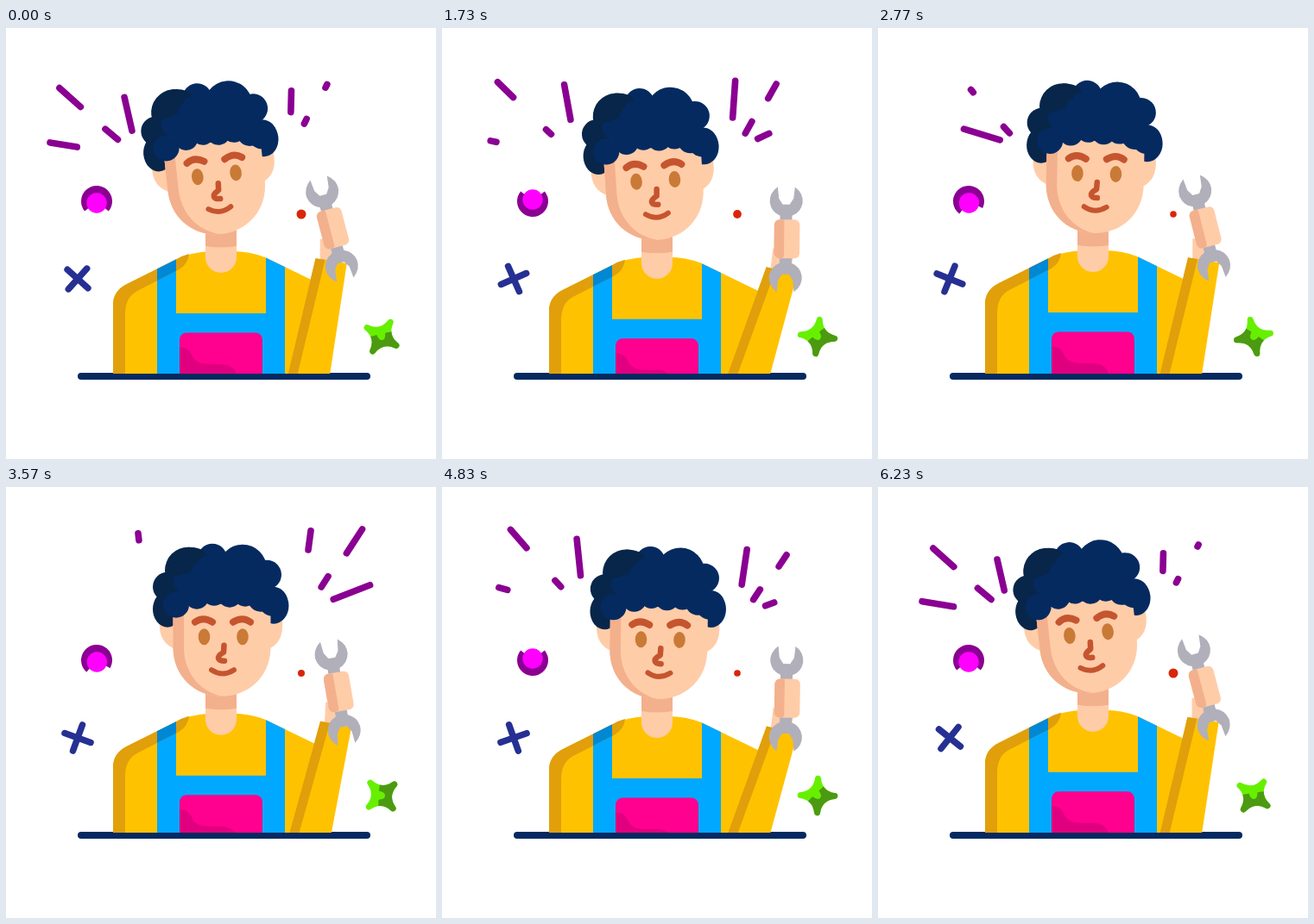
An HTML page with a canvas that plays this animation: 498x500 px, repeating every 6260 ms.

```html
<!DOCTYPE html>
<html lang="en">
<head>
<meta charset="utf-8">
<title>Handyman</title>
<style>
html, body { margin: 0; width: 100%; height: 100%; overflow: hidden; background: #fff; }
canvas { display: block; width: 498px; height: 500px; }
</style>
</head>
<body>
<canvas id="stage" width="498" height="500"></canvas>
<script>
const ctx = document.getElementById('stage').getContext('2d');
const LOOP = 6260, BURST = LOOP / 4, TAU = Math.PI * 2, DEG = Math.PI / 180;
const C = {
  yellow: '#ffc200', ochre: '#e09f0b', blue: '#00a8ff', deepBlue: '#0088d4',
  pink: '#ff008f', deepPink: '#e0007f', skin: '#ffcca8', shade: '#f3b08c',
  navy: '#052a60', dark: '#08264a', rust: '#c5552f', eye: '#c97a36',
  steel: '#b1afb9', purple: '#8a0092', magenta: '#ff00ff', red: '#d9260a',
  indigo: '#263093', lime: '#66f000', green: '#4c9a12'
};

// Burst rays in head space: inner end, outer end, start delay
const RAYS = [
  [139, 137, 64, 116, 0], [150, 129, 129, 107, 100],
  [107, 82.5, 76.5, 48.5, 230], [160, 114, 153, 54, 305],
  [345, 111, 353, 51, 425], [359, 126, 373, 104, 505],
  [388, 87, 414, 47, 595], [373, 133, 432, 110, 675]
];

const wave = (t, cycles, peak) => Math.cos(TAU * (cycles * t / LOOP - peak));
const ease = u => { u = Math.min(1, Math.max(0, u)); return u * u * (3 - 2 * u); };

function fill(d, color) {
  ctx.fillStyle = color;
  ctx.fill(new Path2D(d));
}
function stroke(d, color, width) {
  ctx.strokeStyle = color;
  ctx.lineWidth = width;
  ctx.lineCap = ctx.lineJoin = 'round';
  ctx.stroke(new Path2D(d));
}
function oval(x, y, rx, color, ry = rx) {
  ctx.fillStyle = color;
  ctx.beginPath();
  ctx.ellipse(x, y, rx, ry, 0, 0, TAU);
  ctx.fill();
}
function box(x, y, w, h, r, color) {
  ctx.fillStyle = color;
  ctx.beginPath();
  ctx.roundRect(x, y, w, h, r);
  ctx.fill();
}
function turn(x, y, deg) {
  ctx.translate(x, y);
  ctx.rotate(deg * DEG);
  ctx.translate(-x, -y);
}
function layer(draw) {
  ctx.save();
  draw();
  ctx.restore();
}
const clip = d => ctx.clip(new Path2D(d));

const TORSO = 'M124 412V325Q124 309 140 301L196 273Q213 264 238 263H262Q282 263 300 270L372 305L345 412Z';
const SLEEVE_SHADE = 'M124 412V325Q124 309 140 301L196 273Q204 268 212 266Q211 278 199 285L152 309Q138 316 138 336V412Z';

function drawTorso() {
  fill(TORSO, C.yellow);
  layer(() => {
    clip(TORSO);
    fill('M175 250H197V335H301V250H323V412H175Z', C.blue);
  });
  fill(SLEEVE_SHADE, C.ochre);
  layer(() => {
    clip('M175 250H197V350H175Z');
    fill(SLEEVE_SHADE, C.deepBlue);
  });
  box(201, 357.5, 96, 60, 8, C.pink);
  fill('M201 374Q212 375 215 383Q219 394 235 394H250Q265 395 267 407V412H201Z', C.deepPink);
  fill('M231 225H267V270A18 18 0 0 1 231 270Z', C.skin);
  fill('M231 225H267V257Q249 260 231 257Z', C.shade);
}

function drawWrenchEnd() {
  fill('M-10 -16.500Q-20 -9 -19 2Q-17 13 -7 17V28H7V17Q17 13 19 2Q20 -9 10 -16.500L8.500 -3L4 4H-4L-8.500 -3Z', C.steel);
}

function drawArm(t) {
  const swing = wave(t, 2, .955);
  turn(340, 426, -3.6 * (swing - .397));
  fill('M370 250L369 276L390 280L396 250Z', C.skin);
  fill('M364 272L400 279L374.5 414H325Z', C.yellow);
  fill('M364 272L375 274L336 414H325Z', C.ochre);
  ctx.translate(384, 238);
  ctx.rotate((-7.8 - 5 * swing) * DEG);
  layer(() => { ctx.translate(0, -44); drawWrenchEnd(); });
  layer(() => { ctx.translate(0, 45); ctx.scale(1, -1); drawWrenchEnd(); });
  box(-13.5, -22.5, 29.5, 45, 6, C.skin);
  box(-13.5, -22.5, 11.5, 45, [6, 2, 4, 6], C.shade);
}

function drawBurst(t) {
  for (const [x0, y0, x1, y1, delay] of RAYS) {
    const age = (t + 710 - delay + BURST) % BURST;
    const head = ease(age / 650), tail = ease((age - 345) / 650);
    if (head - tail < .04) continue;
    const at = k => `${x0 + (x1 - x0) * k} ${y0 + (y1 - y0) * k}`;
    stroke(`M${at(tail)}L${at(head)}`, C.purple, 7.6);
  }
}

function drawHead(t) {
  turn(251, 246, -5 * wave(t, 3, 0) - 1.2);
  drawBurst(t);

  // Ears tucked under the back hair
  fill('M178 156Q176 182 198 189V150Z', C.skin);
  fill('M320 156Q322 182 302 189V150Z', C.skin);
  oval(211, 97, 27, C.dark);
  oval(187, 116, 17, C.dark);
  oval(187, 142, 17, C.dark, 21);
  oval(310, 138, 17.5, C.navy, 21);

  // Face
  fill('M193.500 125V186C193.500 220 219 243 250 243S306.500 220 306.500 186V125Z', C.skin);
  fill('M193.500 125V186C193.500 220 219 243 250 243C222 237 206 213 206 186V125Z', C.shade);

  // Front hair
  oval(252, 110, 58, C.navy, 26);
  const curls = [
    [239, 83, 17], [274, 95, 28], [302, 102, 17], [309, 133, 17], [197, 137, 15],
    [221, 128, 14], [241, 125, 13], [259, 126, 14], [277, 125, 14], [295, 130, 15]
  ];
  for (const [x, y, r] of curls) oval(x, y, r, C.navy);
  fill('M211 70Q228 70 233 79Q218 85 214 99L196 104L190 92Z', C.dark);

  // Features
  stroke('M219 157Q228 150 239 157', C.rust, 8);
  stroke('M263 157Q274 150 283 157', C.rust, 8);
  oval(229.5, 174, 6.8, C.eye, 9.5);
  oval(274, 174, 6.8, C.eye, 9.5);
  stroke('M252.500 184L252 192Q245 196 246 199Q247 202 253 202', C.rust, 6.5);
  stroke('M238 212.500Q251 221 264 212.500', C.rust, 6);
}

function drawRing(t) {
  const gap = Math.PI * ease((1 - wave(t, 2, .02)) / 2);
  const mid = Math.PI / 2 - gap, half = 50 * DEG;
  ctx.translate(105, 201);
  ctx.strokeStyle = C.purple;
  ctx.lineWidth = 9;
  ctx.lineCap = 'butt';
  ctx.beginPath();
  ctx.arc(0, 0, 13.5, mid + half, mid - half + TAU);
  ctx.stroke();
  oval(2 * Math.cos(mid), 2 * Math.sin(mid), 11.7, C.magenta);
}

function drawCross(t) {
  ctx.translate(83, 291);
  ctx.rotate((110 + 88 * wave(t, 2, .391)) * DEG);
  stroke('M-16 0H16M0 -16V16', C.indigo, 7.5);
}

function drawStar(t) {
  const star = 'M14 -14Q3 0 14 14Q0 3 -14 14Q-3 0 -14 -14Q0 -3 14 -14Z';
  ctx.translate(435, 358);
  ctx.rotate((-40 + 86 * wave(t, 2, .8)) * DEG);
  const paint = color => { fill(star, color); stroke(star, color, 7); };
  paint(C.lime);
  clip('M-30 -3H-5Q-4 4 0 4Q4 4 5 -3H30V30H-30Z');
  paint(C.green);
}

function render(t) {
  ctx.fillStyle = '#fff';
  ctx.fillRect(0, 0, 498, 500);
  layer(() => drawRing(t));
  layer(() => drawCross(t));
  layer(() => drawStar(t));
  oval(342, 216, 4.3 + 1.2 * wave(t, 3, 0), C.red);

  stroke('M87 404H418', C.navy, 8);
  layer(() => {
    clip('M0 0H498V401H0Z');
    ctx.translate(0, -5 * wave(t, 2, .9));
    layer(drawTorso);
    layer(() => drawArm(t));
    layer(() => drawHead(t));
  });
}

const begin = performance.now();
function tick() {
  render((performance.now() - begin) % LOOP);
  requestAnimationFrame(tick);
}
tick();
</script>
</body>
</html>
```
